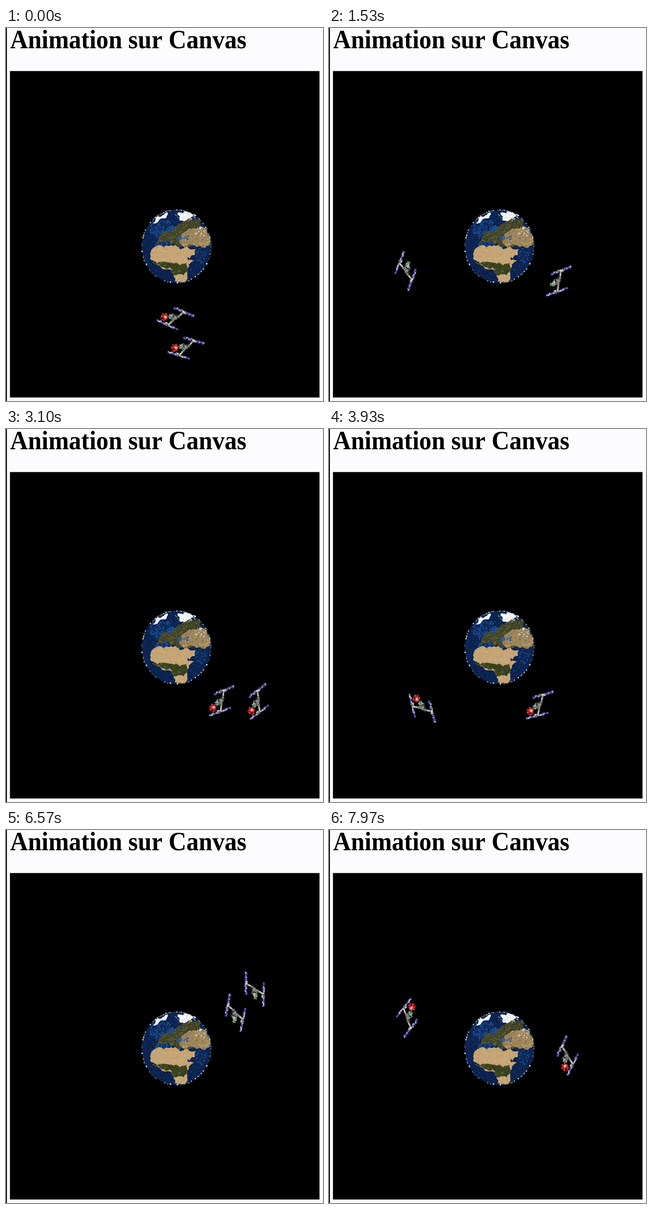
An HTML page with a canvas for the animation above (8 s loop, 691 by 811 pixels).

```html
<!DOCTYPE html>
<html lang="fr">
<head>
<meta charset="utf-8">
<title>Animation sur Canvas</title>
<style>
  html, body { margin: 0; width: 100%; height: 100%; overflow: hidden; background: #fcfcfe; }
  canvas { display: block; width: 691px; height: 811px; }
</style>
</head>
<body>
<canvas id="stage" width="691" height="811"></canvas>
<script>
const W = 691, H = 811, LOOP = 8000;
const ASPECT = 1.052;        // the whole view is slightly taller than wide
const EARTH = { x: 371.5, y: 475, r: 75.5 };
const TICK = 0.65;           // moment within each second when the orbits step
const MID_PHASE = 0.47;      // phase at which the drift is zero
const START_ANGLE = 79;

// Degrees: "step" is added once per second, "drift" runs between the steps.
const OUTER = { radius: 210, step: 104, drift: -42 };
const INNER = { radius: 148, step: -11, drift: -96 };

const ctx = document.getElementById('stage').getContext('2d');

function makeRandom(seed) {
  return () => {
    seed = (seed * 16807) % 2147483647;
    return seed / 2147483647;
  };
}

function layer(w, h, draw) {
  const c = document.createElement('canvas');
  c.width = w;
  c.height = h;
  draw(c.getContext('2d'));
  return c;
}

function speckle(g, rnd, colors, count, x, y, rx, ry = rx) {
  for (let i = 0; i < count; i++) {
    const a = rnd() * 2 * Math.PI, d = Math.sqrt(rnd()), s = 1 + rnd() * 2;
    g.fillStyle = colors[i % colors.length];
    g.fillRect(x + Math.cos(a) * d * rx - s / 2, y + Math.sin(a) * d * ry - s / 2, s, s);
  }
}

// Splits every edge at a randomly shifted midpoint, so a few points give a ragged coast.
function roughen(points, rnd, depth) {
  if (!depth) return points;
  const out = points.flatMap(([x, y], i) => {
    const [u, v] = points[(i + 1) % points.length];
    const shift = (rnd() - 0.5) * 0.4;
    return [[x, y], [(x + u) / 2 + (v - y) * shift, (y + v) / 2 - (u - x) * shift]];
  });
  return roughen(out, rnd, depth - 1);
}

// Paints a ragged region filled with speckles of its colours.
function land(g, rnd, colors, points) {
  const xs = points.map(p => p[0]), ys = points.map(p => p[1]);
  const left = Math.min(...xs), right = Math.max(...xs);
  const top = Math.min(...ys), bottom = Math.max(...ys);
  const w = right - left, h = bottom - top;
  g.save();
  g.beginPath();
  roughen(points, rnd, 3).forEach(p => g.lineTo(...p));
  g.closePath();
  g.fillStyle = colors[0];
  g.fill();
  g.clip();
  speckle(g, rnd, colors, w * h / 9, left + w / 2, top + h / 2, w * 0.7, h * 0.7);
  g.restore();
}

// Coordinates are relative to the centre of the globe.
function drawEarth(g) {
  const rnd = makeRandom(71), r = EARTH.r;
  const sand = ['#c5a475', '#d2b487', '#b99767', '#c9aa7c'];
  const steppe = ['#9c845b', '#b99c70', '#776641', '#c3a87c'];
  const forest = ['#424529', '#2f381f', '#5c5933', '#6f6742'];
  const jungle = ['#39431f', '#28361b', '#4f5429', '#626036'];
  const ice = ['#eef1f3', '#ffffff', '#dde4ea'];
  const sea = ['#1b4b92', '#153d7c', '#225399'];

  g.save();
  g.translate(EARTH.x, EARTH.y);
  g.scale(1, ASPECT);
  g.save();
  g.beginPath();
  g.arc(0, 0, r, 0, 2 * Math.PI);
  g.fillStyle = '#0c2450';
  g.fill();
  g.clip();
  speckle(g, rnd, ['#123874', '#081838', '#0b2048'], 700, 0, 0, r);
  speckle(g, rnd, sea, 260, -32, -36, 26, 22);
  speckle(g, rnd, sea, 150, -12, -4, 36, 7);
  speckle(g, rnd, sea, 60, 52, 18, 12, 16);

  land(g, rnd, forest, [[-46, -5], [-38, -20], [-18, -38], [14, -51], [52, -54], [74, -10], [56, 0], [0, -3]]);
  land(g, rnd, steppe, [[6, -10], [22, -32], [52, -42], [76, -12], [62, 3], [40, -2], [14, -1]]);
  land(g, rnd, sea, [[-20, -32], [-8, -44], [-4, -36], [-14, -28]]);
  speckle(g, rnd, ['#2b5590', '#3a6396'], 26, 9, -17, 9, 4);
  speckle(g, rnd, ['#2b5590', '#3a6396'], 12, 24, -18, 3, 5);

  land(g, rnd, sand, [[-57, 26], [-55, 8], [-40, -2], [-15, -1], [10, 6], [26, 29], [38, 29],
    [24, 50], [16, 74], [-4, 72], [-11, 49], [-34, 42]]);
  land(g, rnd, jungle, [[-54, 31], [-10, 34], [24, 31], [25, 49], [16, 60], [-6, 60], [-14, 43], [-34, 41]]);
  land(g, rnd, sand, [[11, 5], [24, 0], [44, 5], [40, 17], [28, 25], [17, 15]]);

  land(g, rnd, ice, [[-52, -48], [-42, -62], [-19, -70], [-25, -58]]);
  land(g, rnd, ice, [[2, -69], [24, -73], [36, -62], [18, -53], [8, -54]]);
  speckle(g, rnd, ice, 40, 18, -62, 24, 10);
  speckle(g, rnd, ['#dcd8ca', '#a99a7c'], 34, 52, -30, 12, 12);
  g.restore();

  // Broken bright rim
  for (let a = 0; a < 2 * Math.PI; a += 0.035) {
    if (rnd() < 0.5) continue;
    speckle(g, rnd, [rnd() < 0.5 ? '#dfe3e6' : '#5d7088'], 1, r * Math.cos(a), r * Math.sin(a), 0.8);
  }
  g.restore();
}

const scene = layer(W, H, g => {
  g.fillStyle = '#fcfcfe';
  g.fillRect(0, 0, W, H);
  g.fillStyle = '#000';
  g.fillRect(0, 0, 2, H);
  g.fillRect(8.6, 93.6, 674.8, 709.8);
  g.save();
  g.scale(1, ASPECT);
  g.font = 'bold 53.6px "Liberation Serif", "Times New Roman", serif';
  g.fillText('Animation sur Canvas', 9, 43.5 / ASPECT);
  g.restore();
  drawEarth(g);
});

// A bar with a solid core and ragged speckles along it.
function bar(g, rnd, colors, width, x1, y1, x2, y2) {
  g.strokeStyle = colors[0];
  g.lineWidth = width * 0.8;
  g.beginPath();
  g.moveTo(x1, y1);
  g.lineTo(x2, y2);
  g.stroke();
  const length = Math.hypot(x2 - x1, y2 - y1);
  for (let d = 0; d < length; d += 0.9) {
    const k = d / length;
    speckle(g, rnd, [colors[Math.floor(rnd() * colors.length)]], 1,
      x1 + (x2 - x1) * k, y1 + (y2 - y1) * k, width * 0.45);
  }
}

const STATION = 100;
const station = lit => layer(STATION, STATION, g => {
  const rnd = makeRandom(9);
  const wing = [lit ? '#2c2872' : '#40318c', '#6a60b4', '#8f86cc', '#241f5c', '#d2cee9'];
  const metal = ['#8d8a81', '#d8d4c9', '#b5b1a5', '#f0eee6', '#5a5953'];
  g.translate(STATION / 2, STATION / 2);
  bar(g, rnd, wing, 5.6, -5, -22, 40, -4);
  bar(g, rnd, wing, 5.6, -41, 5, 4, 23);
  bar(g, rnd, metal, 3.4, -18, 14, 18, -13);
  bar(g, rnd, metal, 2.4, 13, -17, 21, -9);
  bar(g, rnd, metal, 2.4, -22, 9, -14, 17);
  speckle(g, rnd, ['#4b4e4b', '#b9b8ad', '#2f3230', '#85877f'], 70, -4, -3, 12, 6);
  if (lit) {
    speckle(g, rnd, ['#71ad72', '#8fb9c4'], 14, -13, -4, 5, 4);
    speckle(g, rnd, ['#d92a2c', '#e8443f', '#c82024'], 80, -25, -2, 7.5);
    speckle(g, rnd, ['#fff0ea', '#f59a90'], 7, -24, -1, 3);
  } else {
    speckle(g, rnd, ['#69aec6', '#91d2de', '#d6c95c'], 24, -15, -4, 7, 4);
  }
});
const SPRITES = { lit: station(true), dark: station(false) };

function drawOrbiter({ radius, step, drift }, count, phase) {
  const lit = phase < 0.5;
  const angle = (START_ANGLE + step * count + drift * (phase - MID_PHASE)) * Math.PI / 180;
  const lead = lit ? 0 : Math.atan(54 / radius);
  ctx.save();
  ctx.translate(EARTH.x, EARTH.y);
  ctx.scale(1, ASPECT);
  ctx.translate(radius * Math.cos(angle), radius * Math.sin(angle));
  ctx.rotate(angle - Math.PI / 2 + lead);
  ctx.drawImage(lit ? SPRITES.lit : SPRITES.dark, -STATION / 2, -STATION / 2);
  ctx.restore();
}

function render(ms) {
  const clock = ms / 1000 + 1 - TICK;
  const count = Math.floor(clock), phase = clock - count;
  ctx.drawImage(scene, 0, 0);
  drawOrbiter(OUTER, count, phase);
  drawOrbiter(INNER, count, phase);
}

const start = performance.now();
function tick() {
  render((performance.now() - start) % LOOP);
  requestAnimationFrame(tick);
}
tick();
</script>
</body>
</html>
```
